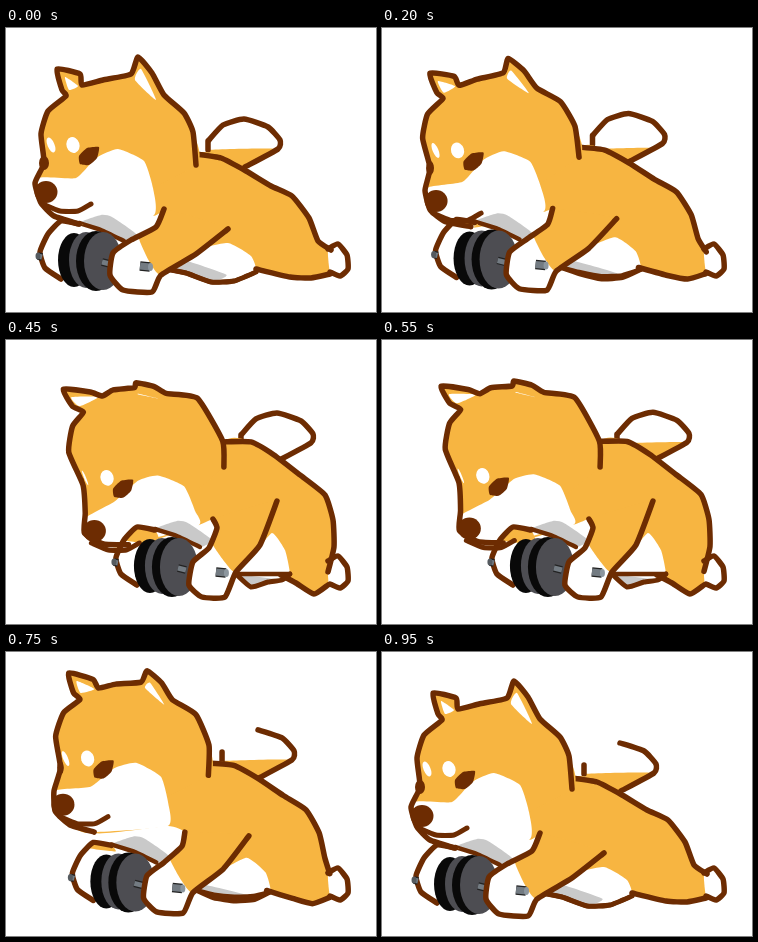
These frames come from a looping animation (370x284 px, 1 s). An HTML page with a canvas:

```html
<!DOCTYPE html>
<html>
<head>
<meta charset="utf-8">
<style>
html, body { margin: 0; width: 100%; height: 100%; overflow: hidden; background: #fff; }
canvas { display: block; }
</style>
</head>
<body>
<canvas id="stage" width="370" height="284"></canvas>
<script>
const ctx = document.getElementById('stage').getContext('2d');
const BROWN = '#6d2c02', ORANGE = '#f7b541', WHITE = '#fff', GREY = '#c9c9c9';
const LOOP = 1000, STEP = 50;

const points = s => s.split(' ').map(p => p.split(',').map(Number));
const mix = (a, b, k) => [a[0] + (b[0] - a[0]) * k, a[1] + (b[1] - a[1]) * k];
const move = (pts, dx, dy) => pts.map(([x, y]) => [x + dx, y + dy]);

// Key points at rest and at full reach.
const flexible = {
  skull: ['190,137 187,104 178,85 158,67 146,45 132,29 125,46',
          '218,128 217,102 192,59 161,54 149,47 131,43 129,48'],
  crown: ['97,52 76,57 74,46 51,41 56,62 60,68',
          '108,50 97,56 85,52 58,49 67,66 78,72'],
  face: ['42,83 35,106 38,135 29,155 35,175 48,188 73,196',
         '67,86 63,112 77,145 79,173 78,193 97,204 122,205'],
  muzzle: ['33,150 70,150 90,130 112,121 138,133 147,160 147,188',
           '79,178 108,162 132,141 152,136 178,147 189,172 192,186'],
  marks: ['83,128 40,164', '117,149 88,191'],
  arm: ['158,181 150,199 125,212 107,225 104,247 117,262 146,264 155,247 190,226 222,201',
        '207,179 211,188 203,208 187,222 183,245 196,257 219,257 230,232 254,205 271,161'],
  back: ['190,126 215,130 240,143 265,158 286,168 303,190 312,213 325,222',
         '217,102 245,102 268,115 294,135 319,155 327,180 328,207 322,232'],
  rump: ['324,246 305,250 284,249 250,241', '322,245 308,254 290,243 275,235'],
  belly: ['160,241 180,245 205,254 228,253 250,244 245,228 222,215 190,222',
          '230,234 245,247 262,242 276,240 284,234 279,210 266,193 248,215']
};
for (const name in flexible) flexible[name] = flexible[name].map(points);

// Shapes that keep their form.
const foot = points('322,221 332,216 341,227 342,241 334,248 324,244');
const tail = points('202,122 202,113 203,112 217,97 238,91 262,99 274,112 272,121 239,139');
const shade = points('73,195 95,187 106,189 130,206 118,213 95,202');
const farArm = points('73,196 55,193 42,206 34,224 39,240 55,251');
const almond = points('-10,0 -2,-8 10,-9 8,2 0,9 -9,8');
const smile = points('-3,12 14,19 32,19 45,12');

function poseAt(t) {
  const phase = Math.max(0, t - 50) / 900 * 2 * Math.PI;
  const reach = 1.03 * (1 - Math.cos(phase)) / 2;
  const out = phase < Math.PI, swing = Math.sin(phase) ** 2;
  const tilt = swing * (out ? -.07 : .095);
  const lift = swing * (out ? -3.3 : -16);

  const p = { reach, out, tailOpen: t >= 700 };
  for (const name in flexible) {
    const [rest, full] = flexible[name];
    p[name] = rest.map((q, i) => mix(q, full[i], reach));
  }
  // The head dips on the way out and rises on the way back.
  for (const name of ['skull', 'crown', 'face', 'muzzle', 'marks'])
    p[name] = p[name].map(([x, y]) =>
      [x - tilt * (y - 138), y + tilt * (x - 140) + lift]);

  p.wheel = [76 * reach, -6 * reach];
  p.back = move(p.back, 0, lift * .3);
  p.tail = move(tail, 33 * reach, -18 * reach + lift * .35);
  p.shade = move(shade, ...p.wheel);
  p.farArm = move(farArm, ...p.wheel);
  return p;
}

function trace(pts, closed) {
  const n = pts.length;
  const at = i => closed ? pts[(i + n) % n] : pts[Math.max(0, Math.min(n - 1, i))];
  ctx.beginPath();
  ctx.moveTo(...pts[0]);
  for (let i = 0; i < (closed ? n : n - 1); i++) {
    const [a, b, c, d] = [at(i - 1), at(i), at(i + 1), at(i + 2)];
    ctx.bezierCurveTo(b[0] + (c[0] - a[0]) / 12, b[1] + (c[1] - a[1]) / 12,
      c[0] - (d[0] - b[0]) / 12, c[1] - (d[1] - b[1]) / 12, c[0], c[1]);
  }
}

function fill(pts, color) {
  trace(pts, true);
  ctx.fillStyle = color;
  ctx.fill();
}

function line(pts, width = 5.5) {
  trace(pts, false);
  ctx.lineCap = 'round';
  ctx.strokeStyle = BROWN;
  ctx.lineWidth = width;
  ctx.stroke();
}

function oval(x, y, rx, ry, color, turn = 0) {
  ctx.beginPath();
  ctx.ellipse(x, y, rx, ry, turn, 0, 7);
  ctx.fillStyle = color;
  ctx.fill();
}

function rod(x1, y1, x2, y2, r) {
  ctx.lineCap = 'butt';
  ctx.beginPath();
  ctx.moveTo(x1, y1);
  ctx.lineTo(x2, y2);
  for (const [width, color] of [[2 * r + 1.5, '#222'], [2 * r - 1, '#737b82']]) {
    ctx.lineWidth = width;
    ctx.strokeStyle = color;
    ctx.stroke();
  }
}

function drawTail({ tail, back, reach, out, tailOpen }) {
  const root = tail[8], edge = out ? Math.max(0, 1 - reach) : 1;
  fill(tail, WHITE);
  fill([mix(root, tail[0], edge), mix(root, tail[7], edge), root, back[2], back[1]], ORANGE);
  line(tail.slice(0, 2));
  line(tail.slice(tailOpen ? 4 : 2));
}

function drawBody(p) {
  const under = p.belly.slice(0, 5);
  fill([...p.back, ...p.rump, ...under.slice().reverse(),
    p.arm[1], p.arm[0], p.muzzle[6], p.face[6]], ORANGE);
  fill(p.belly, WHITE);
  const [a, b, c, d, e] = under, top = p.belly[7], depth = Math.max(0, 1 - p.reach);
  fill([a, mix(a, top, .5 * depth), mix(d, top, .2 * depth), c, b], GREY);
  line(under, 5);
  line(under.map((q, i) => mix(q, mix(a, e, i / 4), p.reach)), 4.5);
  line(p.rump);
  fill(foot, WHITE);
  line(foot);
  line(p.back);
}

function drawFace({ marks: [eye, nose], face, reach }) {
  const slim = Math.max(0, 1 - reach);
  fill(move(almond, ...eye), BROWN);
  oval(...face[2], 1 + 4 * slim, 7, BROWN);
  oval(eye[0] - 16, eye[1] - 11, 6.5, 8, WHITE, -.3);
  oval(eye[0] - 38, eye[1] - 11, 1 + 2.5 * slim, 8, WHITE, -.4);
  oval(...nose, 11.5, 11, BROWN);
  line(move(smile, ...nose), 5);
}

function drawEars({ skull, crown }) {
  const inner = (corners, shifts) =>
    fill(corners.map(([x, y], i) => [x + shifts[i][0], y + shifts[i][1]]), WHITE);
  inner([skull[6], skull[5], skull[3]], [[4, 6], [3, 12], [-8, 5]]);
  inner([crown[1], crown[3], crown[4]], [[-4, 1], [8, 8], [7, 0]]);
}

function drawHead(p) {
  const { face, muzzle, shade, farArm, reach } = p;
  const outline = [...p.skull, ...p.crown, ...face];
  fill(outline, ORANGE);
  fill([...muzzle, face[6], face[5], face[4]], WHITE);
  fill([shade[1], muzzle[6], p.arm[1], shade[3]], WHITE);
  fill(shade, GREY);
  line([shade[0], shade[5], shade[4]], 4.5);
  drawEars(p);

  const [a, b, c] = farArm;
  fill(farArm, WHITE);
  fill([a, b, mix(b, c, reach), [a[0] + 4, a[1] + 14 * reach]], ORANGE);
  line(farArm);
  line(outline);
  drawFace(p);
}

function drawPlates() {
  rod(32, 228, 36, 229, 3);
  oval(32, 228, 2.5, 3.5, '#555b60');
  oval(68, 232, 16, 27, '#090909');
  oval(80, 232, 17, 28, '#4d4d52');
  oval(90, 233, 20, 30, '#090909');
  oval(97, 233, 19, 29, '#4d4d52');
  rod(96, 234, 104, 236, 3);
}

function drawGrip() {
  rod(134, 238, 144, 239, 4);
  oval(144.5, 239, 2.5, 4, '#8c969e');
}

function drawArm({ arm }) {
  fill(arm.slice(1, 8), WHITE);
  fill([arm[0], arm[1], mix(arm[1], arm[2], .7), mix(arm[2], arm[7], .6),
    ...arm.slice(7)], ORANGE);
  line(arm);
}

function withWheel([dx, dy], paint) {
  ctx.save();
  ctx.translate(dx, dy);
  paint();
  ctx.restore();
}

function draw() {
  const p = poseAt(Math.floor(performance.now() % LOOP / STEP) * STEP);
  ctx.fillStyle = WHITE;
  ctx.fillRect(0, 0, 370, 284);
  ctx.lineJoin = 'round';
  drawTail(p);
  drawBody(p);
  drawHead(p);
  withWheel(p.wheel, drawPlates);
  drawArm(p);
  withWheel(p.wheel, drawGrip);
  requestAnimationFrame(draw);
}
draw();
</script>
</body>
</html>
```
